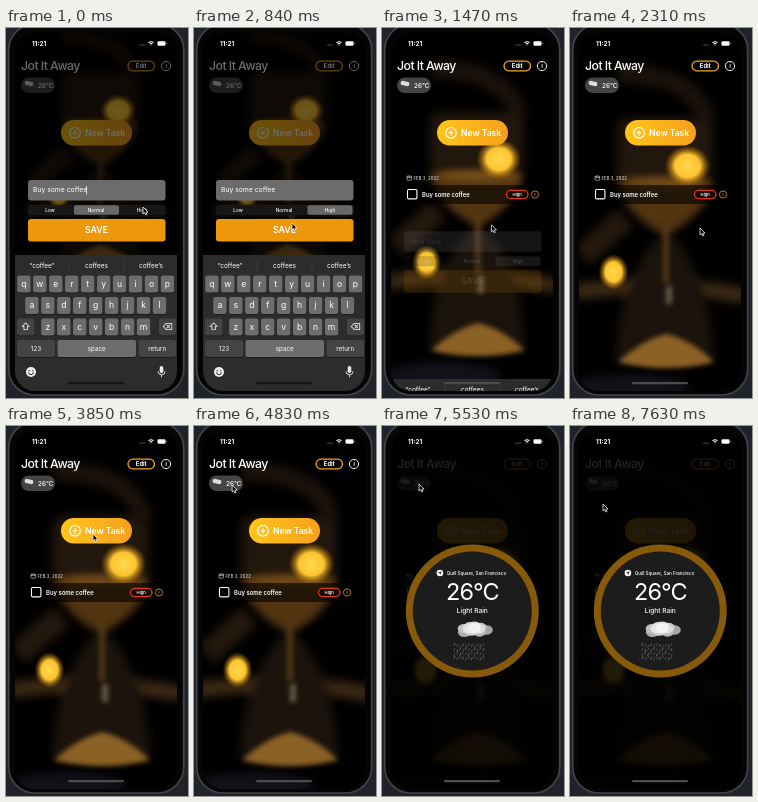
An HTML page with a canvas for the animation above (8 s loop, 182 px wide and 370 px high).

```html
<!DOCTYPE html>
<html lang="en">
<head>
<meta charset="utf-8">
<title>To-do app</title>
<style>
html, body { margin: 0; width: 100%; height: 100%; overflow: hidden; background: #20242a; }
canvas { display: block; width: 182px; height: 370px; }
</style>
</head>
<body>
<canvas></canvas>
<script>
const LOOP = 8000, W = 182, H = 370;
const canvas = document.querySelector('canvas');
const c = canvas.getContext('2d');
const dpr = window.devicePixelRatio || 1;
canvas.width = W * dpr;
canvas.height = H * dpr;

const AMBER = '#f5a51c';
const POINTER = new Path2D('M0 0V7L1.6 5.6 2.7 8 3.9 7.5 2.8 5.1 5 5Z');
const NAVIGATE = new Path2D('M1.7-1.7L.3 2.1-.2.2-2-.2Z');

const clamp = v => Math.max(0, Math.min(1, v));
const mix = (a, b, k) => a + (b - a) * k;

// Eased progress from 0 to 1 between two times
function ramp(t, from, to) {
  const k = clamp((t - from) / (to - from));
  return k * k * (3 - 2 * k);
}

function cursorAt(t) {
  const spot = { x: 137, y: 179 };
  const move = (from, to, x, y) => {
    const k = ramp(t, from, to);
    spot.x = mix(spot.x, x, k);
    spot.y = mix(spot.y, y, k);
  };
  move(350, 840, 98, 195);
  move(910, 2300, 130, 200);
  move(2590, 3150, 89, 110);
  move(3780, 3850, 87, 108);
  move(4130, 4900, 37, 58);
  move(6370, 6720, 35, 59);
  move(6930, 7630, 33, 78);
  return spot;
}

function scoped(draw) {
  c.save();
  draw();
  c.restore();
}

function box(x, y, w, h, r, fill, stroke, line = 1) {
  c.beginPath();
  c.roundRect(x, y, w, h, r);
  if (fill) { c.fillStyle = fill; c.fill(); }
  if (stroke) { c.strokeStyle = stroke; c.lineWidth = line; c.stroke(); }
}

function disc(x, y, rx, fill, ry = rx) {
  c.beginPath();
  c.ellipse(x, y, rx, ry, 0, 0, 7);
  c.fillStyle = fill;
  c.fill();
}

function arc(x, y, r, color, line = 1, from = 0, to = 7) {
  c.beginPath();
  c.arc(x, y, r, from, to);
  c.strokeStyle = color;
  c.lineWidth = line;
  c.stroke();
}

function stroke(d, color, line = 1) {
  c.strokeStyle = color;
  c.lineWidth = line;
  c.stroke(new Path2D(d));
}

function fillPath(d, color) {
  c.fillStyle = color;
  c.fill(new Path2D(d));
}

function text(s, x, y, size, { weight = 500, color = '#fff', align = 'left', spacing = 0 } = {}) {
  c.font = `${weight} ${size}px Inter, 'DejaVu Sans', sans-serif`;
  c.letterSpacing = spacing + 'px';
  c.textAlign = align;
  c.fillStyle = color;
  c.fillText(s, x, y + size * 0.36);
}

const label = (s, x, y, size, options) => text(s, x, y, size, { align: 'center', ...options });

function infoIcon(x, y, r, color) {
  arc(x, y, r, color, r * 0.2);
  label('i', x, y, r * 1.5, { color });
}

function lamp(x, y, rx, ry) {
  scoped(() => {
    c.translate(x, y);
    c.scale(rx, ry);
    const g = c.createRadialGradient(0, 0, 0, 0, 0, 1);
    g.addColorStop(0, '#ffd84c');
    g.addColorStop(0.55, '#fcc430');
    g.addColorStop(1, '#a8680000');
    disc(0, 0, 1, g);
  });
}

function hourglass(scale, lift) {
  scoped(() => {
    c.translate(90 * (1 - scale), -lift);
    c.scale(scale, scale);
    const blur = px => { c.filter = `blur(${px * scale * dpr}px)`; };

    // Blurred wooden frame
    blur(5);
    disc(60, 360, 60, '#11111a', 14);
    stroke('M48 46Q125 45 138 95', '#1b120b', 18);
    stroke('M12 228L56 190', '#24180d', 24);
    stroke('M4 264Q90 252 176 268', '#3b2814', 16);
    disc(66, 263, 11, '#5a3a20', 8);

    // Two glass bulbs joined by a neck
    fillPath('M47 100Q48 88 62 90H126Q142 88 143 102V160Q138 182 100 205H92Q54 185 47 160Z', '#22170d');
    fillPath('M92 205H100Q142 250 144 335H46Q48 250 92 205Z', '#1b130c');

    // Sand
    blur(4);
    fillPath('M49 152H141Q138 182 99 205H93Q54 184 49 152Z', '#533511');
    disc(96, 155, 42, '#744d19', 6);
    blur(2.5);
    stroke('M96 195V255', '#533615', 6);
    stroke('M99 258V276', '#6a5a4a', 6);
    fillPath('M48 334Q72 312 96 306Q122 312 144 334Q96 346 48 334Z', '#8c6125');

    c.filter = 'none';
    lamp(117.5, 138, 23, 21);
    lamp(43.5, 244, 15, 18);
  });
}

function home(showTask) {
  text('Jot It Away', 15, 38, 12.3, { spacing: -0.55 });
  box(122, 33.2, 26.5, 9.6, 4.8, '#0006', AMBER, 1.3);
  label('Edit', 135.3, 38, 5.8, { weight: 700 });
  infoIcon(160, 38, 4.6, '#fff');

  box(15, 49.5, 34, 15.5, 7.7, '#454545');
  for (let i = -1; i <= 1; i++) disc(23 + i * 2.2, 55.5 + i * 0.5, 2.2, '#ddd');
  text('26°C', 32, 57.5, 6.4);

  const fill = c.createLinearGradient(55, 0, 126, 0);
  fill.addColorStop(0, '#ffc51b');
  fill.addColorStop(1, '#f6a01e');
  box(55, 92, 71, 25.5, 12.7, fill);
  arc(69, 104.8, 5.3, '#fff', 1.2);
  stroke('M66.4 104.8h5.2M69 102.2v5.2', '#fff', 1.1);
  text('New Task', 79, 104.8, 8.7, { weight: 600, spacing: -0.1 });

  if (!showTask) return;
  box(25, 148, 4.6, 4.2, 0.7, null, '#ddd', 0.6);
  stroke('M25 149.1h4.6', '#ddd', 0.9);
  text('FEB 3, 2022', 31.5, 150, 4.2, { color: '#ddd', spacing: 0.12 });
  box(23, 157, 148, 19, 0, '#0009');
  box(25.5, 161.5, 9.4, 9.4, 1.2, null, '#fff', 1.1);
  text('Buy some coffee', 40, 166.5, 5.9, { weight: 600 });
  box(124.5, 162.4, 21.5, 8.2, 4.1, '#1a0805', '#df391d', 1.3);
  label('High', 135.2, 166.5, 4.1, { weight: 600 });
  infoIcon(153, 166.5, 3.6, AMBER);
}

function taskForm(t) {
  const saved = t >= 910;
  const leave = ramp(t, 910, 1610);
  scoped(() => {
    c.globalAlpha = 1 - leave * leave;
    c.translate(0, 57 * leave);
    box(22, 152, 137.5, 20.5, 3, '#6c6c6c');
    if (saved) text('New Task', 28, 162, 6.8, { color: '#999', weight: 400 });
    else text('Buy some coffee', 27, 162, 6.8, { weight: 400 });
    if (!saved && t % 1000 < 500) box(80.1, 158, 0.8, 8.5, 0, '#fff');

    box(22, 177, 137.5, 10, 2, '#171717');
    box(68 + 45.5 * ramp(t, 70, 320), 177.3, 45, 9.4, 2, '#686868');
    ['Low', 'Normal', 'High'].forEach((s, i) => label(s, 44 + 46 * i, 182, 4.8));

    box(22, 191, 137.5, 22.5, 3, saved ? '#9d6507' : '#ed980b');
    label('SAVE', 90.5, 202, 8.8, { weight: 600, color: saved ? '#bba988' : '#fff' });
  });
}

function key(s, x, row, w = 13.4, fill = '#6d6d6d', size = 8.6) {
  const y = 247.5 + 21.5 * row;
  box(x, y + 0.8, w, 17, 2.2, '#151515');
  box(x, y, w, 17, 2.2, fill);
  label(s, x + w / 2, y + 8.3, size, { weight: 400 });
}

function keyboard(t) {
  scoped(() => {
    c.translate(0, 145 * ramp(t, 1095, 1590));
    box(9, 227, 162, 140, 0, '#2c2c2c');
    ['“coffee”', 'coffees', 'coffee’s'].forEach((s, i) =>
      label(s, 36 + 54.5 * i, 238, 6.5, { weight: 400 }));
    stroke('M63 233v10M118 233v10', '#4a4a4a', 0.6);

    ['qwertyuiop', 'asdfghjkl', 'zxcvbnm'].forEach((letters, row) => {
      const left = 91 - letters.length * 7.98;
      [...letters].forEach((s, i) => key(s, left + 15.95 * i, row));
    });
    key('⇧', 11, 2, 17.5, '#444', 10);
    key('⌫', 153, 2, 17, '#444', 9);
    key('123', 11, 3, 38, '#444', 6.3);
    key('space', 51.5, 3, 78.5, '#6d6d6d', 6.3);
    key('return', 132.5, 3, 37.5, '#444', 6.3);

    disc(25, 344, 5, '#eee');
    [-1.7, 1.7].forEach(dx => disc(25 + dx, 342.7, 0.7, '#333'));
    arc(25, 344.3, 2.4, '#333', 1, 0, Math.PI);

    box(153.7, 338, 3.6, 7, 1.8, '#eee');
    arc(155.5, 343.3, 3.5, '#eee', 0.9, 0, Math.PI);
    stroke('M155.5 346.8v2.4', '#eee', 0.9);
  });
}

function rainCloud() {
  c.filter = `blur(${0.6 * dpr}px)`;
  for (let i = 0; i < 12; i++) {
    const angle = i * 2.4, spread = 1 - i / 14;
    const shade = 165 + i * 7;
    disc(1 + 13 * spread * Math.cos(angle), 19 + 4 * spread * Math.sin(angle) - i * 0.2,
      6.5, `rgb(${shade},${shade},${shade})`, 4.8);
  }
  c.filter = 'none';
  for (let i = 0; i < 44; i++) {
    const x = -18 + (i % 11) * 2.9, y = 32 + Math.floor(i / 11) * 4.2 + (i * 7 % 5) * 0.5;
    stroke(`M${x + 0.8} ${y}l-1.4 2.8`, i % 3 ? '#777' : '#aaa', 0.55);
  }
}

function weather(scale) {
  if (!scale) return;
  scoped(() => {
    c.translate(90.3, 185);
    c.scale(scale, scale);
    disc(0, 0, 66.5, '#87590a');
    disc(0, 0, 59.5, '#1c1c1c');
    text('Quill Square, San Francisco', -25.5, -38, 4.6, { spacing: -0.03 });
    label('26°C', 0, -19, 23.5, { weight: 400, spacing: -1 });
    label('Light Rain', 0, -0.8, 6.6);
    rainCloud();
    c.translate(-32.4, -38);
    disc(0, 0, 3.3, '#fff');
    c.fillStyle = '#1c1c1c';
    c.fill(NAVIGATE);
  });
}

function statusBar() {
  text('11:21', 26, 15.5, 6.3, { weight: 700 });
  for (let i = 0; i < 3; i++) disc(134 + 2 * i, 17, 0.5, '#bbb');
  for (let i = 0; i < 3; i++) arc(145, 17.6, 0.3 + 1.7 * i, '#fff', 1.1, -2.3, -0.84);
  box(151.5, 13.2, 8, 4.6, 1.3, '#fff');
  box(160, 14.7, 0.7, 1.6, 0.3, '#aaa');
}

function pointer({ x, y }) {
  scoped(() => {
    c.translate(x, y);
    c.fillStyle = '#000';
    c.strokeStyle = '#eee';
    c.lineWidth = 0.8;
    c.fill(POINTER);
    c.stroke(POINTER);
  });
}

const shade = alpha => box(0, 0, W, H, 0, `rgba(0,0,0,${alpha})`);

function draw(t) {
  c.setTransform(dpr, 0, 0, dpr, 0, 0);
  box(0, 0, W, H, 0, '#20242a');
  box(2.7, -4, 175, 371, 26, '#050505', '#414448', 1.7);
  scoped(() => {
    box(9, 5, 162, 358, 20, '#000');
    c.clip();
    const grow = ramp(t, 980, 1610);
    hourglass(mix(0.8, 1, grow), 28 * (1 - grow));
    home(t >= 980);
    shade(0.58 * (1 - ramp(t, 910, 1230)));
    if (t < 1610) {
      taskForm(t);
      keyboard(t);
    }
    shade(0.87 * ramp(t, 4930, 5190));
    weather(ramp(t, 5150, 5530));
    statusBar();
    box(62, 354, 56, 2.2, 1.1, t < 980 ? '#151515' : '#4c4c4c');
  });
  pointer(cursorAt(t));
}

const start = performance.now();
function frame() {
  draw((performance.now() - start) % LOOP);
  requestAnimationFrame(frame);
}
frame();
</script>
</body>
</html>
```
